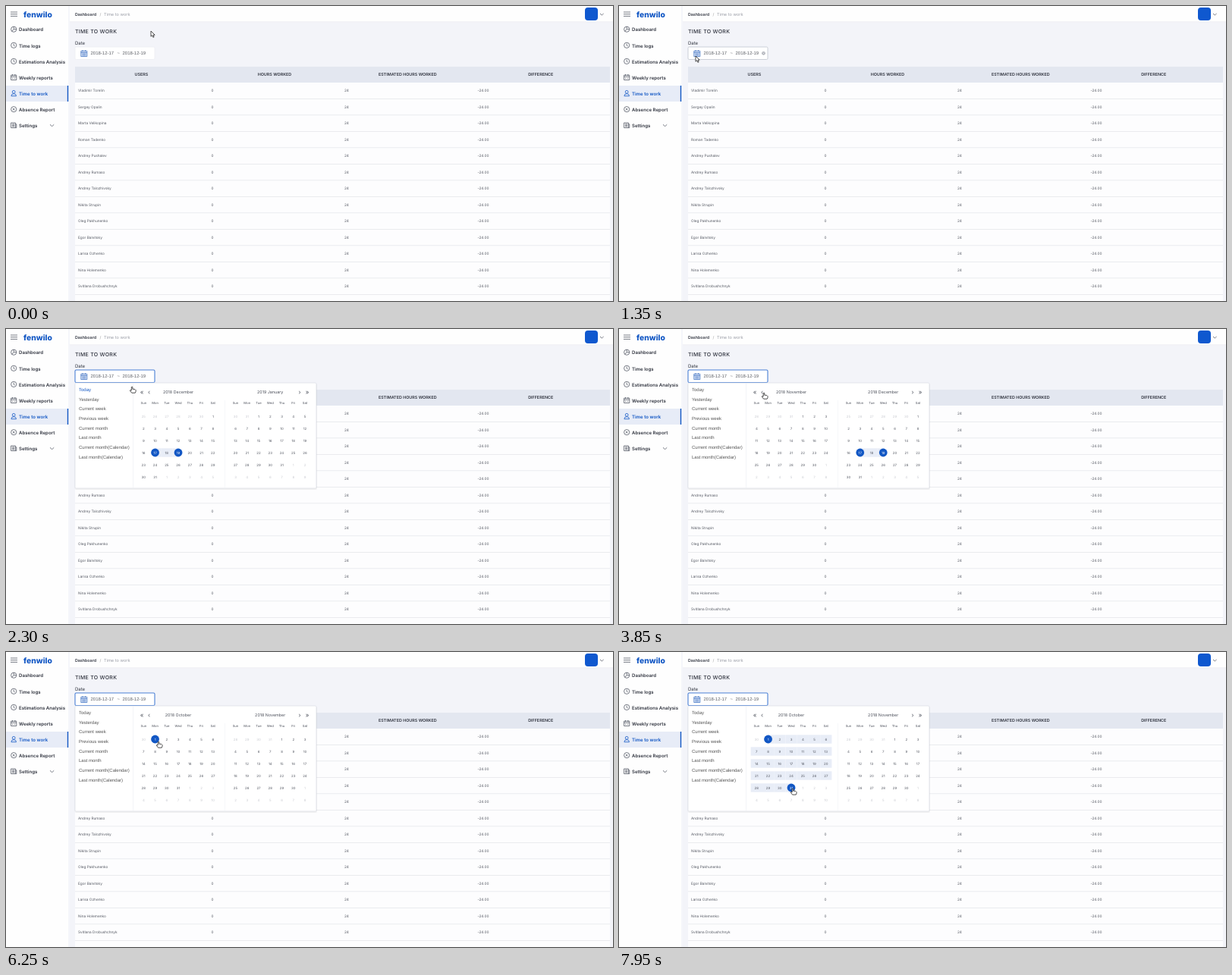
Recreate the animation shown at these times as an HTML page. Size 800 by 389 pixels, loop 8000 ms.

```html
<!DOCTYPE html>
<html lang="en">
<head>
<meta charset="utf-8">
<title>Time to work</title>
<style>
  html, body { margin: 0; width: 100%; height: 100%; overflow: hidden; background: #fff; }
  svg { display: block; width: 100vw; height: 100vh; }
  text { font-family: Inter, sans-serif; white-space: pre; }
  .arial { font-family: "Liberation Sans", Arial, sans-serif; }
  .icon { fill: none; stroke: #555a66; stroke-width: .8; }
</style>
</head>
<body>
<svg id="stage" viewBox="0 0 800 389" text-rendering="geometricPrecision">
  <g id="page"></g>
  <g id="field"></g>
  <g id="popup"></g>
  <path id="arrow" d="M0 0V7.2L1.7 5.7 2.9 8.3 4.1 7.8 3 5.2H5.2Z" fill="#fff" stroke="#222" stroke-width=".8"/>
  <path id="hand" d="M-.8 .6Q0-.6 .8.6V3.2Q4.8 3 5 4.6V6.4L4.2 8.2H-.4L-2.8 5Q-2.4 3.8-.8 5Z"
        fill="#fff" stroke="#222" stroke-width=".8" stroke-linejoin="round"/>
</svg>
<script>
const LOOP = 8000;
const OPEN = 1750, TO_NOVEMBER = 3000, TO_OCTOBER = 4400, PICK = 5800;
const BLUE = '#1257c4', INK = '#30343f', BAND = '#e8edf7';
const byId = id => document.getElementById(id);

// y is the vertical middle of the line
const text = (x, y, string, size, fill = INK, attrs = '') =>
  `<text x="${x}" y="${y + size * .36}" font-size="${size}" fill="${fill}" ${attrs}>${string}</text>`;
const rect = (x, y, w, h, fill, attrs = '') =>
  `<rect x="${x}" y="${y}" width="${w}" height="${h}" fill="${fill}" ${attrs}/>`;
const path = (d, attrs = '') => `<path class="icon" d="${d}" ${attrs}/>`;
const MIDDLE = 'text-anchor="middle"';
const BOLD = 'font-weight="600"';
const ARIAL = 'class="arial"';

const users = ['Vladimir Torelin', 'Sergey Opalin', 'Marta Velikopina', 'Roman Tadenko',
  'Andrey Pushalev', 'Andrey Rumaso', 'Andrey Talozhivsky', 'Nikita Strupin', 'Oleg Pakhunenko',
  'Egor Balvitsky', 'Larisa Ozhenko', 'Nina Holemenko', 'Svitlana Drobushchnyk', 'Kirylo Mashunin'];

const CLOCK = 'M-3.6 0A3.6 3.6 0 1 0 3.6 0A3.6 3.6 0 1 0-3.6 0';
const menu = [
  ['Dashboard', CLOCK + 'M0-3.6V0H3.6M0 0L-2.5 2.5'],
  ['Time logs', CLOCK + 'M0-2.2V.3L1.5 1'],
  ['Estimations Analysis', CLOCK + 'M0-2.2V.3L1.5 1'],
  ['Weekly reports', 'M-3.6-2.8H3.6V3.5H-3.6ZM-3.6-.8H3.6M-1.7-4V-2M1.7-4V-2M-2 1.3H-.8M.8 1.3H2'],
  ['Time to work', 'M-1.9-1.8A1.9 1.9 0 1 0 1.9-1.8A1.9 1.9 0 1 0-1.9-1.8M-3.3 3.6Q-3.3.6 0 .6T3.3 3.6Z'],
  ['Absence Report', CLOCK + 'M-1.3-1.3L1.3 1.3M1.3-1.3L-1.3 1.3'],
  ['Settings', 'M-3.6-3.3H2.2V3.3H-3.6ZM2.2-1.5H3.6V3.3H2M-2.2-1.5H1M-2.2 0H1M-2.2 1.5H1']
];

function drawPage() {
  let out = rect(0, 0, 800, 389, '#fefefe') + rect(84, 21, 716, 368, '#f3f4f9') +
    rect(82, 0, 2, 389, '#f5f6fa') + rect(84, 20.5, 716, .7, '#e9ebf1');

  out += path('M6 8H15M6 10.7H15M6 13.4H15', 'stroke-width="1"');
  out += text(23, 10.8, 'fenwilo', 10.3, BLUE, 'font-weight="800"');
  out += text(91, 10.8, 'Dashboard', 5.3, INK, BOLD) + text(123.5, 10.8, '/', 5.3, '#999') +
    text(129, 10.8, 'Time to work', 5.6, '#9a9da6');
  out += rect(763, 2, 17, 17, '#0f58cf', 'rx="4"') + path('M783 10L785.3 12 787.6 10');

  menu.forEach(([label, icon], i) => {
    const y = 31 + 21.1 * i, active = i === 4;
    if (active) out += rect(0, 105, 82, 21, '#e7ecf7') + rect(80.8, 105, 1.4, 21, BLUE);
    out += path(icon, `transform="translate(10.2 ${y - .3})" ${active ? `style="stroke:${BLUE}"` : ''}`);
    out += text(17, y + .3, label, 6.1, active ? BLUE : INK, BOLD);
  });
  out += path('M58 156.3L60.6 158.7 63.2 156.3', 'stroke-width="1"');

  out += text(91, 33.3, 'TIME TO WORK', 7, INK, 'font-weight="500" letter-spacing=".25"') +
    text(91, 48.8, 'Date', 6, INK);

  out += rect(91, 80, 705, 309, '#fdfdfe') + rect(91, 80, 705, 21, '#e3e7f0');
  ['USERS', 'HOURS WORKED', 'ESTIMATED HOURS WORKED', 'DIFFERENCE'].forEach((title, i) =>
    out += text(178.5 + 175.4 * i, 90.3, title, 5.4, INK, BOLD + MIDDLE));
  users.forEach((user, i) => {
    const y = 111.5 + 21.5 * i;
    [user, '0', '24', '-24.00'].forEach((value, col) =>
      out += text(95 + 175.5 * col, y, value, 4.75, '#555963'));
    out += rect(91, y + 10.5, 705, .7, '#e2e4e9');
  });
  byId('page').innerHTML = out;
}

function drawField(hovered, open) {
  const border = open ? '#4a80d6' : hovered ? '#bfc4cf' : '#eceef3';
  let out = rect(91, 54, 105, 16.5, '#fff', `rx="1.5" stroke="${border}" stroke-width="${open ? 1.1 : .8}"`);
  out += path('M98.8 59.3H106.8V66.6H98.8ZM98.8 61.5H106.8M101 58V60.2M104.6 58V60.2M100.3 63.2H105.4M100.3 65H105.4',
    'style="stroke:#4676c4;fill:#dfe8f8"');
  out += text(111.5, 62.3, '2018-12-17', 6, '#5c5f66', ARIAL) + text(146.5, 62.3, '~', 6, '#5c5f66', ARIAL) +
    text(153.5, 62.3, '2018-12-19', 6, '#5c5f66', ARIAL);
  if (hovered && !open) out += '<circle cx="190.5" cy="62.3" r="2.4" fill="#b0b3ba"/>' +
    path('M189.6 61.4L191.4 63.2M191.4 61.4L189.6 63.2', 'style="stroke:#fff;stroke-width:.6"');
  byId('field').innerHTML = out;
}

const DAY_NAMES = ['Sun', 'Mon', 'Tue', 'Wed', 'Thu', 'Fri', 'Sat'];
const colX = (left, col) => left + 15.25 * col;
const rowY = row => 115 + 16 * row;

// Month 9 is October 2018; start and end are timestamps of a selected range
function drawMonth(left, month, start, end, hover) {
  const first = new Date(Date.UTC(2018, month, 1));
  const name = first.toLocaleString('en-US', { month: 'long', timeZone: 'UTC' });
  let bands = '', days = '';
  for (let i = 0; i < 42; i++) {
    const col = i % 7, row = Math.floor(i / 7), x = colX(left, col), y = rowY(row);
    const date = new Date(Date.UTC(2018, month, 1 + i - first.getUTCDay()));
    const inside = date.getUTCMonth() === first.getUTCMonth(), time = +date;
    const picked = inside && (time === start || time === end);
    if (inside && start < end && time >= start && time <= end) {
      const from = time === start ? x : x - 7.63, to = time === end ? x : x + 7.63;
      bands += rect(from, y - 5.7, to - from, 11.4, BAND);
    }
    if (picked) days += `<circle cx="${x}" cy="${y}" r="5.4" fill="${BLUE}"/>`;
    else if (i === hover) days += `<circle cx="${x}" cy="${y}" r="5.4" fill="${BAND}"/>`;
    days += text(x, y, date.getUTCDate(), 4.4, picked ? '#fff' : inside ? '#555963' : '#c8cad0', MIDDLE);
  }
  return bands + days + text(left + 45.7, 83.2, `${first.getUTCFullYear()} ${name}`, 5.4, '#4a4e59', MIDDLE) +
    DAY_NAMES.map((day, col) => text(colX(left, col), 97.5, day, 4.2, '#4a4e59', MIDDLE)).join('');
}

const presets = ['Today', 'Yesterday', 'Current week', 'Previous week', 'Current month', 'Last month',
  'Current month(Calendar)', 'Last month(Calendar)'];

function drawPopup({ open, month, start, end, hover, today }) {
  let out = '';
  if (open) {
    out += rect(90.5, 72, 319.5, 140, '#000', 'opacity=".05" rx="2"') +
      rect(91, 71, 318, 139, '#fff', 'rx="1.5" stroke="#d9dce3" stroke-width=".7"') +
      rect(167, 71.5, .6, 138, '#ebedf2') + rect(288, 94, .6, 116, '#f1f2f6');
    presets.forEach((label, i) =>
      out += text(96, 80 + 12.65 * i, label, 6, i || !today ? '#555' : BLUE, ARIAL));
    [['«', 179], ['‹', 188.5], ['›', 387], ['»', 397]].forEach(([sign, x]) =>
      out += text(x, 82.9, sign, 8, '#555963', MIDDLE));
    out += drawMonth(181.3, month, start, end, hover) + drawMonth(302.5, month + 1, start, end);
  }
  byId('popup').innerHTML = out;
}

const track = [[0, 191, 33], [250, 191, 33], [1250, 101, 66], [1850, 101, 66], [2300, 166, 76],
  [2700, 191, 84], [4600, 191, 84], [5000, 194, 101], [5400, 201, 118], [6250, 201, 118],
  [7050, 229, 180], [LOOP, 229, 180]];

// Hermite curve through the track, at rest where the pointer stops
function pointerAt(t) {
  const i = track.findIndex((key, n) => n && t <= key[0]) - 1;
  const a = track[i], b = track[i + 1], span = b[0] - a[0], u = (t - a[0]) / span;
  const slope = (n, axis) => {
    const before = track[n - 1], here = track[n], after = track[n + 1];
    if (!before || !after || before[axis] === here[axis] || here[axis] === after[axis]) return 0;
    return (after[axis] - before[axis]) / (after[0] - before[0]);
  };
  return [1, 2].map(axis => {
    const p = a[axis], q = b[axis], v = slope(i, axis) * span, w = slope(i + 1, axis) * span;
    return p + u * (v + u * (3 * (q - p) - 2 * v - w + u * (2 * (p - q) + v + w)));
  });
}

let fieldKey, popupKey;
function render(t) {
  const [x, y] = pointerAt(t), open = t >= OPEN;
  const inField = x > 91 && x < 196 && y > 54 && y < 70.5;
  if (fieldKey !== (fieldKey = `${inField} ${open}`)) drawField(inField, open);

  const col = Math.round((x - 181.3) / 15.25), row = Math.round((y - 115) / 16);
  const hover = t >= TO_OCTOBER && row >= 0 ? row * 7 + col : -1;
  const selecting = t >= PICK;
  const state = {
    open, hover,
    month: t < TO_NOVEMBER ? 11 : t < TO_OCTOBER ? 10 : 9,
    start: selecting ? Date.UTC(2018, 9, 1) : Date.UTC(2018, 11, 17),
    end: selecting ? Date.UTC(2018, 9, hover) : Date.UTC(2018, 11, 19),
    today: open && x < 167 && y > 73 && y < 86
  };
  if (popupKey !== (popupKey = JSON.stringify(state))) drawPopup(state);

  const pointing = open && y > 71;
  for (const id of ['arrow', 'hand']) {
    byId(id).setAttribute('transform', `translate(${x} ${y})`);
    byId(id).style.display = pointing === (id === 'hand') ? '' : 'none';
  }
}

function tick() {
  render(performance.now() % LOOP);
  requestAnimationFrame(tick);
}
drawPage();
tick();
</script>
</body>
</html>
```
